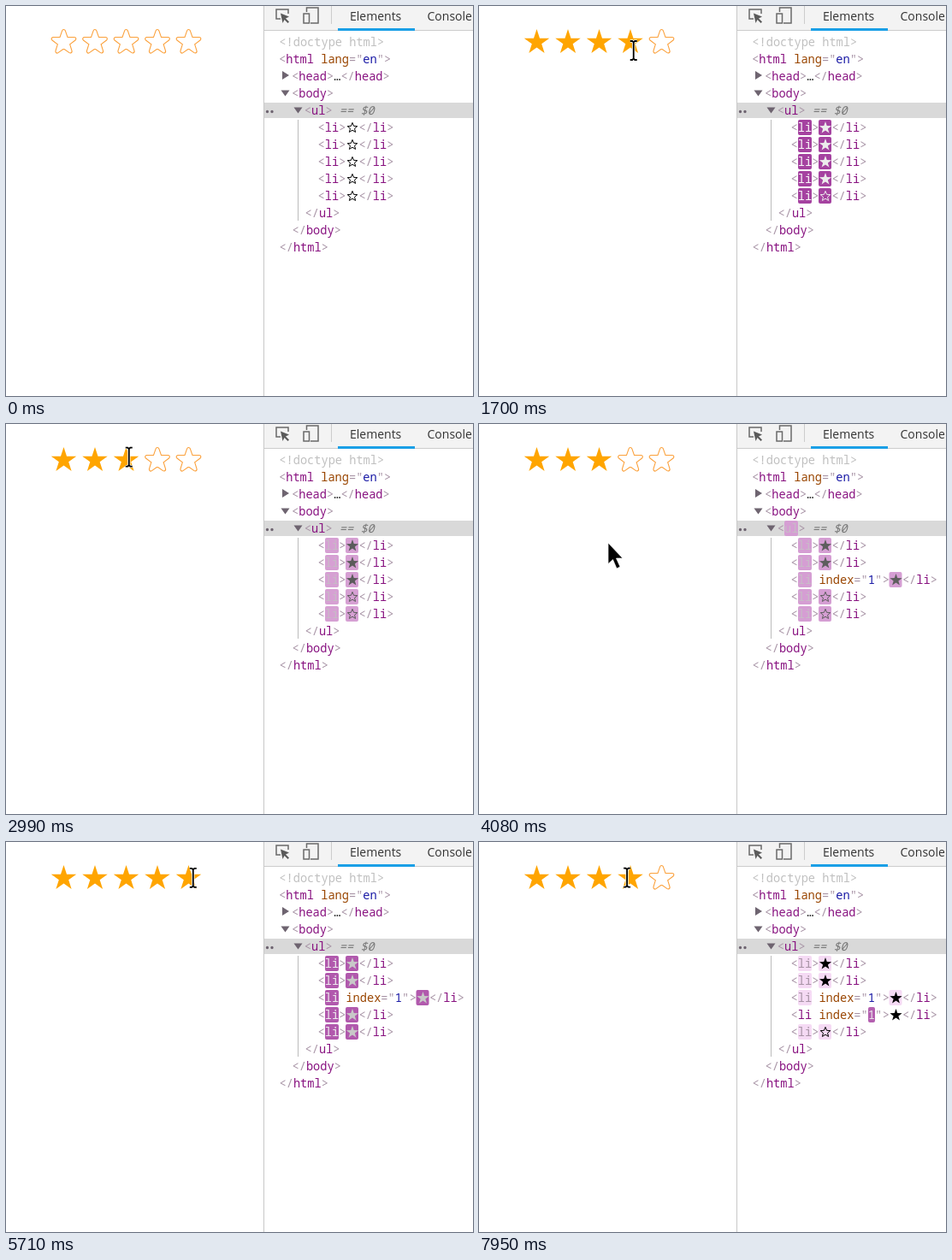
Recreate the animation shown at these times as an HTML page. Size 546 by 456 pixels, loop 8 s.

```html
<!DOCTYPE html>
<html lang="en">
<head>
<meta charset="utf-8">
<title>Star rating</title>
<style>
  html, body { margin: 0; width: 100%; height: 100%; overflow: hidden; background: #fff; }
  svg { display: block; }
  text { white-space: pre; }
  .code { font: 13.667px "Noto Sans Mono", monospace; fill: #a894a6; }
  .tab { font: 14px "Open Sans", "Noto Sans", sans-serif; fill: #333; }
  .name { fill: #881280; }
  .attr { fill: #994500; }
  .value { fill: #1a1aa6; }
  .dots { fill: #222; }
</style>
</head>
<body>
<svg id="stage" width="546" height="456" viewBox="0 0 546 456">
  <rect x="301" width="1" height="456" fill="#c8c8c8"/>
  <rect x="302" width="244" height="28" fill="#f3f3f3"/>
  <rect x="302" y="28" width="244" height="1" fill="#ccc"/>
  <rect x="388" y="26" width="90" height="3" fill="#1a9fe6"/>
  <rect x="380" width="1" height="21" fill="#ccc"/>
  <g fill="none" stroke="#6a6a6a" stroke-width="1.5">
    <path d="M321 15H316V4H330V9"/>
    <path d="M351.5 7V2H365V20H356"/>
    <rect x="348" y="9" width="6.5" height="11"/>
  </g>
  <path d="M321 8.5l10 4-4 2 4 4-1.500 1.500-4-4-2 4z" fill="#5a5a5a"/>
  <text class="tab" x="402" y="17">Elements</text>
  <text class="tab" x="492.5" y="17">Console</text>
  <rect x="302" y="113" width="244" height="18" fill="#d9d9d9"/>
  <rect x="341" y="133" width="1" height="118" fill="#bbb"/>
  <path d="M323 76l8 5-8 5zM321.5 98.5h10l-5 7zM336.5 118.5h10l-5 7z" fill="#6e6470"/>
  <path d="M305.5 123.500h11" stroke="#6e6470" stroke-width="3.4" stroke-linecap="round" stroke-dasharray="0 5.500"/>
</svg>
<script>
const LOOP = 8000, STEP = 76.9, START = 240;
const FADE = 1400, COLS = 8.2, FIRST = 67.5, GAP = 36.5;
const WHITE = [255, 255, 255], BLACK = [0, 0, 0], BRACKET = [168, 148, 166];
const PURPLE = [136, 18, 128], BLUE = [26, 26, 166];
const HOT = [158, 54, 153], PALE = [245, 219, 244];

// Pointer path: time, x, y
const path = [
  [240, 204, 430], [470, 44, 156], [640, 44, 156], [1000, 66, 38], [1150, 104, 32],
  [1450, 212, 44], [1600, 214, 50], [1680, 195, 52], [1700, 181, 52], [2150, 68, 46],
  [2310, 66, 44], [2598, 122.5, 42], [2990, 147.5, 38], [3070, 138, 34],
  [3600, 141, 42], [3766, 146, 65], [4000, 151, 139], [4560, 151, 139],
  [5000, 106, 40], [5450, 97, 38], [5627, 195.5, 41], [5710, 222, 42],
  [6240, 166, 40], [6800, 210, 41], [6896, 195, 41], [6930, 188.5, 41],
  [7640, 165, 38], [7800, 167, 39], [7950, 174, 42]
];
const clicks = [{ t: 3500, row: 2 }, { t: 7842, row: 3 }];

const stage = document.getElementById("stage");

function add(parent, tag, attrs, text) {
  const el = document.createElementNS("http://www.w3.org/2000/svg", tag);
  for (const key in attrs) el.setAttribute(key, attrs[key]);
  if (text) el.textContent = text;
  return parent.appendChild(el);
}

const show = (el, on) => el.setAttribute("visibility", on ? "visible" : "hidden");

function starPath(cx, cy, outer, ratio) {
  let d = "";
  for (let i = 0; i < 10; i++) {
    const r = i % 2 ? outer * ratio : outer, a = i * Math.PI / 5;
    d += (i ? "L" : "M") + (cx + r * Math.sin(a)).toFixed(2) + " " + (cy - r * Math.cos(a)).toFixed(2);
  }
  return d + "z";
}

// Writes pieces of code side by side; each piece is [text, class]
function code(parent, x, y, ...pieces) {
  const line = add(parent, "text", { class: "code", x, y });
  for (const [text, cls] of pieces) add(line, "tspan", cls ? { class: cls } : {}, text);
  return line;
}

const tag = (name, close) => [[close ? "</" : "<"], [name, "name"], [">"]];

const doctype = code(stage, 319.3, 47, ["<!doctype html>"]);
doctype.style.cssText = "fill:#c0c0c0;font-weight:500";
code(stage, 319, 67, ["<"], ["html", "name"], [" "], ["lang", "attr"], ['="'], ["en", "value"], ['">']);
code(stage, 334, 87, ...tag("head"), ["…", "dots"], ...tag("head", true));
code(stage, 334, 107, ...tag("body"));
code(stage, 349.5, 247, ...tag("ul", true));
code(stage, 334.5, 267, ...tag("body", true));
code(stage, 319.5, 287, ...tag("html", true));
const equals = code(stage, 389.8, 127, ["== $0"]);
equals.style.cssText = "fill:#777;font-style:italic";

const patch = (parent, x, y, width) =>
  add(parent, "rect", { x, y, width, height: 18, rx: 2, fill: "none" });

// A word with a fading patch behind it
function flashWord(parent, x, y, width, text, rest) {
  const box = patch(parent, Math.round(x), y - 14, width);
  const word = code(parent, x, y, [text]);
  return { box, word, rest };
}

code(stage, 348.8, 127, ["<"]);
const list = flashWord(stage, 357, 127, 16, "ul", PURPLE);
code(stage, 373.4, 127, [">"]);

const rows = [...Array(5).keys()].map(i => {
  const y = 147 + 20 * i, x = 364.6;
  code(stage, x, y, ["<"]);
  const name = flashWord(stage, x + COLS, y, 16, "li", PURPLE);
  const index = add(stage, "g", {});
  code(index, x + 4 * COLS, y, ["index", "attr"], ['="']);
  const value = flashWord(index, x + 11 * COLS, y, 8, "1", BLUE);
  code(index, x + 12 * COLS, y, ['"']);
  const tail = add(stage, "g", {});
  code(tail, x + 3 * COLS, y, [">"]);
  const box = patch(tail, 397, y - 14, 15);
  const full = add(tail, "path", { d: starPath(405, y - 4.5, 7.5, 0.4) });
  const empty = add(tail, "path", { d: starPath(405, y - 4.5, 6.1, 0.44), fill: "none" });
  code(tail, 412.4, y, ...tag("li", true));

  const cx = FIRST + GAP * i, d = starPath(cx, 42.5, 13, 0.4);
  const outline = add(stage, "g", { "stroke-linejoin": "round" });
  add(outline, "path", { d, fill: "none", stroke: "#fba13c", "stroke-width": 5 });
  add(outline, "path", { d, fill: "#fff", stroke: "#fff", "stroke-width": 2.8 });
  const solid = add(stage, "path", { d: starPath(cx, 42.5, 15.5, 0.385), fill: "#ffa500" });
  return { name, index, value, tail, box, full, empty, outline, solid };
});

const arrow = add(stage, "path", {
  d: "M0 0V24.5L5.5 19.5L10 30L14 28L9.5 18H17z",
  stroke: "#fff", "stroke-width": 0.7
});
const beam = add(stage, "g", { fill: "none" });
const serif = y => `M-4 ${y}H-1.5L0 ${y * 0.86}L1.5 ${y}H4`;
const beamPath = serif(-11) + serif(11) + "M0 -10V10";
add(beam, "path", { d: beamPath, stroke: "#fff", "stroke-width": 3.4 });
add(beam, "path", { d: beamPath, stroke: "#000", "stroke-width": 1.8 });

function pointer(t) {
  let i = 1;
  while (i < path.length - 1 && path[i][0] < t) i++;
  const [t0, x0, y0] = path[i - 1], [t1, x1, y1] = path[i];
  const k = Math.min(1, Math.max(0, (t - t0) / (t1 - t0)));
  return { x: x0 + (x1 - x0) * k, y: y0 + (y1 - y0) * k };
}

function hovered({ x, y }) {
  const i = Math.floor((x - FIRST) / GAP + 0.5);
  return y > 18 && y < 64 && i >= 0 && i < 5 ? i : -1;
}

// Every change of the hovered star, found once along the path
const hovers = [];
for (let t = START, last = -1; t < LOOP; t += 2) {
  const star = hovered(pointer(t));
  if (star !== last) hovers.push({ t, star });
  last = star;
}

const latest = (events, t, test = () => true) =>
  events.filter(e => e.t <= t && test(e)).pop();

// cubic-bezier(0, 0, 0.2, 1)
function ease(x) {
  let lo = 0, hi = 1;
  for (let i = 0; i < 20; i++) {
    const s = (lo + hi) / 2;
    if (0.6 * s * s * (1 - s) + s * s * s < x) lo = s; else hi = s;
  }
  return lo * lo * (3 - 2 * lo);
}

const mix = (a, b, k) => a.map((v, i) => Math.round(v + (b[i] - v) * k));
const rgb = (c, alpha = 1) => `rgba(${c},${alpha})`;

// Patch and text colours at a given age of an update
function fade(age, mid, rest) {
  const p = age / FADE;
  if (!(p >= 0 && p < 1)) return { back: "none", ink: rgb(rest) };
  if (p < 0.8) {
    const k = ease(p / 0.8);
    return { back: rgb(mix(HOT, PALE, k)), ink: rgb(mix(WHITE, mid, k)) };
  }
  const k = ease((p - 0.8) / 0.2);
  return { back: rgb(PALE, 1 - k), ink: rgb(mix(mid, rest, k)) };
}

function tint(part, age) {
  const { back, ink } = fade(age, BRACKET, part.rest);
  part.box.setAttribute("fill", back);
  part.word.style.fill = ink;
}

function draw(now) {
  const time = now % LOOP;
  const t = time < START ? time : START + Math.floor((time - START) / STEP + 0.15) * STEP;
  const pos = pointer(t), over = hovered(pos) >= 0, visible = time >= START;
  for (const el of [arrow, beam]) el.setAttribute("transform", `translate(${pos.x} ${pos.y})`);
  show(arrow, visible && !over);
  show(beam, visible && over);

  const hover = latest(hovers, t), left = latest(hovers, t, e => e.star < 0);
  const rated = latest(clicks, t);
  const top = hover && hover.star >= 0 ? hover.star : rated ? rated.row : -1;
  const age = hover ? t - hover.t : Infinity;
  tint(list, left ? t - left.t : Infinity);

  rows.forEach((r, i) => {
    const click = latest(clicks, t, e => e.row === i);
    const fresh = click && click.t > hover.t;
    const rowAge = fresh ? Infinity : age;
    tint(r.name, rowAge);
    tint(r.value, fresh ? t - click.t : Infinity);
    const { back, ink } = fade(rowAge, BLACK, BLACK);
    r.box.setAttribute("fill", back);
    r.full.setAttribute("fill", ink);
    r.empty.setAttribute("stroke", ink);
    r.tail.setAttribute("transform", `translate(${click ? 82.5 : 0} 0)`);
    show(r.index, click);
    const on = i <= top;
    show(r.full, on);
    show(r.empty, !on);
    show(r.solid, on);
    show(r.outline, !on);
  });
}

const begin = performance.now();
function tick() {
  draw(performance.now() - begin);
  requestAnimationFrame(tick);
}
tick();
</script>
</body>
</html>
```
